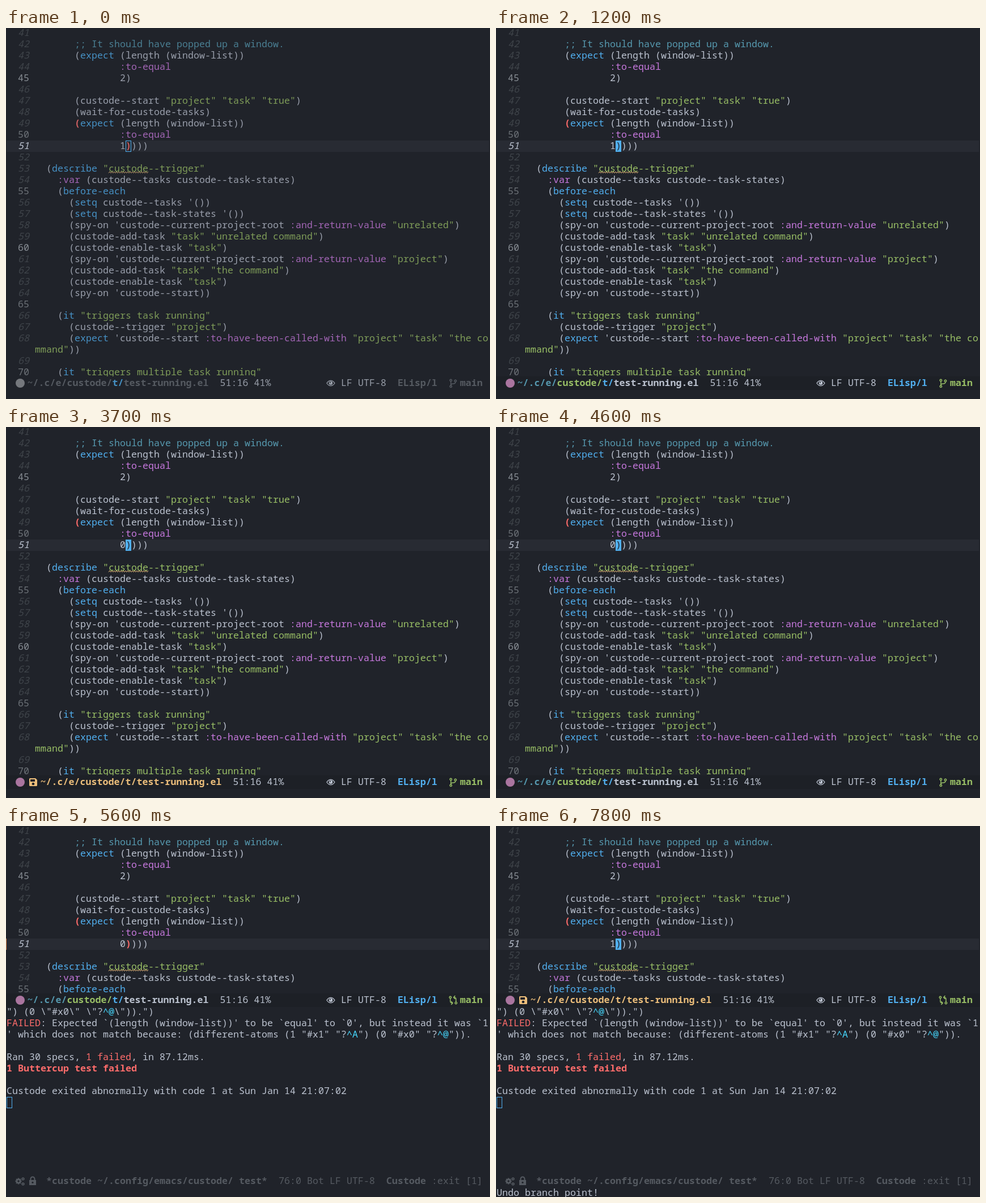
These frames come from a looping animation (854x656 px, 8 s). An HTML page with a canvas:

```html
<!DOCTYPE html>
<html lang="en">
<head>
<meta charset="utf-8">
<title>Editor session</title>
<style>
html, body { margin: 0; width: 100%; height: 100%; overflow: hidden; background: #20232a; }
canvas { display: block; }
</style>
</head>
<body>
<canvas id="stage" width="854" height="656"></canvas>
<script>
const g = document.getElementById('stage').getContext('2d');
const LOOP = 8000, COL = 10, ROW = 20;
const FONT = '16.667px "Noto Sans Mono", "DejaVu Sans Mono", monospace';
const C = {
  bg: '#20232a', line: '#282b33', bar: '#1d2026', fg: '#bbc2cf', blue: '#51afef',
  green: '#98be65', magenta: '#c678dd', teal: '#5699af', red: '#ff6c6b', cyan: '#46d9ff',
  yellow: '#ecbe7b', orange: '#da8548', purple: '#aa759f', grey: '#555a61',
  num: '#3f444a', tick: '#6b7076', major: '#868c93'
};

// Each entry: starting column, then code, from line 41 on
const CODE = [
  [0, ''],
  [12, ';; It should have popped up a window.'],
  [12, '(expect (length (window-list))'],
  [20, ':to-equal'],
  [20, '2)'],
  [0, ''],
  [12, '(custode--start "project" "task" "true")'],
  [12, '(wait-for-custode-tasks)'],
  [12, '(expect (length (window-list))'],
  [20, ':to-equal'],
  [20, ''],
  [0, ''],
  [7, '(describe "custode--trigger"'],
  [9, ':var (custode--tasks custode--task-states)'],
  [9, '(before-each'],
  [11, "(setq custode--tasks '())"],
  [11, "(setq custode--task-states '())"],
  [11, '(spy-on \'custode--current-project-root :and-return-value "unrelated")'],
  [11, '(custode-add-task "task" "unrelated command")'],
  [11, '(custode-enable-task "task")'],
  [11, '(spy-on \'custode--current-project-root :and-return-value "project")'],
  [11, '(custode-add-task "task" "the command")'],
  [11, '(custode-enable-task "task")'],
  [11, "(spy-on 'custode--start))"],
  [0, ''],
  [9, '(it "triggers task running"'],
  [11, '(custode--trigger "project")'],
  [11, '(expect \'custode--start :to-have-been-called-with "project" "task" "the command"))'],
  [0, ''],
  [9, '(it "triggers multiple task running"']
];
const TOKEN = /(;;.*)|("[^"]*")|(:[a-z-]+)|((?<=\()(?:expect|describe|before-each|setq|it)(?![\w-]))|./g;
const TOKEN_COLORS = [C.teal, C.green, C.magenta, C.blue];

const REPORT = [
  [16, [['") (0 \\"#x0\\" \\"?'], ['^@', C.cyan], ['\\")).")']]],
  [17, [['FAILED', C.red], [": Expected `(length (window-list))' to be `equal' to `0', but instead it was `1"]]],
  [18, [['\' which does not match because: (different-atoms (1 "#x1" "?'], ['^A', C.cyan],
        ['") (0 "#x0" "?'], ['^@', C.cyan], ['")).']]],
  [20, [['Ran 30 specs, '], ['1 failed', C.red], [', in 87.12ms.']]],
  [21, [['1 Buttercup test failed', C.red, 'bold']]],
  [23, [['Custode exited abnormally with code 1 at Sun Jan 14 21:07:02']]]
];

const base = row => row * ROW + 14;
const left = col => 1 + col * COL;

function rect(x, y, w, h, color) {
  g.fillStyle = color;
  g.fillRect(x, y, w, h);
}

function text(s, x, y, color = C.fg, style = '') {
  g.font = style + ' ' + FONT;
  g.fillStyle = color;
  for (let i = 0; i < s.length; i++) {
    if (s[i] !== ' ') g.fillText(s[i], x + i * COL, y);
  }
}

function runs(parts, x, y) {
  for (const [s, color, style] of parts) {
    text(s, x, y, color, style);
    x += s.length * COL;
  }
}

function clipped(y, h, draw) {
  g.save();
  g.beginPath();
  g.rect(0, y, 854, h);
  g.clip();
  draw();
  g.restore();
}

function disc(x, y, r, color) {
  g.fillStyle = color;
  g.beginPath();
  g.arc(x, y, r, 0, 7);
  g.fill();
}

function stroke(d, color, width = 1.5) {
  g.strokeStyle = color;
  g.lineWidth = width;
  g.stroke(new Path2D(d));
}

// Icons, centred on x, y
function at(x, y, draw) {
  g.save();
  g.translate(x, y);
  draw();
  g.restore();
}

const floppy = (x, y) => at(x, y, () => {
  g.fillStyle = C.yellow;
  g.fill(new Path2D('M-6-7H4L7-4V6L6 7H-6L-7 6V-6Z'));
  rect(-5, -5, 8, 4, C.bar);
  disc(0, 3, 2.3, C.bar);
});

const eye = (x, y, color) => at(x, y, () => {
  stroke('M-7 0Q-4-4.7 0-4.7T7 0Q4 4.7 0 4.7T-7 0Z', color, 1.3);
  disc(0, -.3, 3.3, color);
  disc(-1, -1.3, 1, C.bar);
});

const branch = (x, y, color) => at(x, y, () => {
  stroke('M-4-3V4M4-2Q4 1 0 1Q-4 1-4 4M-2.4-5a1.7 1.7 0 1 1-3.4 0a1.7 1.7 0 1 1 3.4 0' +
    'M-2.4 5.8a1.7 1.7 0 1 1-3.4 0a1.7 1.7 0 1 1 3.4 0M5.7-4a1.7 1.7 0 1 1-3.4 0a1.7 1.7 0 1 1 3.4 0', color);
});

const compare = (x, y, color) => at(x, y, () => {
  for (const turn of [0, Math.PI]) {
    g.save();
    g.rotate(turn);
    stroke('M-5-3V2Q-5 5-1 5M-3.5 2L-.8 5L-3.5 8M-3.3-5a1.7 1.7 0 1 1-3.4 0a1.7 1.7 0 1 1 3.4 0', color);
    g.restore();
  }
});

function gear(x, y, r, color) {
  g.strokeStyle = color;
  g.lineWidth = r * .5;
  g.beginPath();
  g.arc(x, y, r * .6, 0, 7);
  for (let i = 0; i < 8; i++) {
    const a = i * Math.PI / 4, c = Math.cos(a), s = Math.sin(a);
    g.moveTo(x + c * r * .7, y + s * r * .7);
    g.lineTo(x + c * r * 1.1, y + s * r * 1.1);
  }
  g.stroke();
}

const lock = (x, y, color) => at(x, y, () => {
  stroke('M-3.5-1V-4a3.5 3.5 0 0 1 7 0V-1', color, 2);
  rect(-6, -2, 12, 9, color);
  disc(0, 2.3, 1.6, C.bg);
});

function lineNumbers(rows) {
  for (let r = 0; r < rows; r++) {
    if (r === 28) continue;
    const n = 41 + (r > 28 ? r - 1 : r);
    let color = C.num, style = 'italic';
    if (n === 51) color = C.fg;
    else if (n % 5 === 0) {
      color = n === 45 || n === 60 ? C.major : C.tick;
      style = '';
    }
    text(String(n), left(2), base(r), color, style);
  }
}

function codeLine(col, s, row) {
  for (const m of s.matchAll(TOKEN)) {
    const kind = [1, 2, 3, 4].find(k => m[k]);
    const color = kind ? TOKEN_COLORS[kind - 1] : C.fg;
    for (const ch of m[0]) {
      if (col === 85) { col = 5; row++; }
      text(ch, left(col++), base(row), color);
    }
  }
  return row + 1;
}

function squiggle(x, y, w) {
  g.strokeStyle = C.yellow;
  g.lineWidth = 1;
  g.beginPath();
  for (let i = 0; i <= w; i += 2) g.lineTo(x + i, y + (i % 4 ? 0 : 2.5));
  g.stroke();
}

function hollow(x, y) {
  g.strokeStyle = C.blue;
  g.lineWidth = 1;
  g.strokeRect(x + .5, y + .5, 9, 19);
}

function editor(s) {
  clipped(0, s.split ? 296 : 616, () => {
    rect(1, 199, 851, 20, C.line);
    if (s.fringe) rect(0, 199, 1, 20, C.orange);
    lineNumbers(31);
    g.globalAlpha = s.focus ? 1 : .78;
    let row = 0;
    for (const [col, code] of CODE) row = codeLine(col, code, row);
    squiggle(181, 254, 70);
    rect(left(12), 159, COL, ROW, C.bg);
    text('(', left(12), base(8), C.red, 'bold');
    const col = 20 + s.digit.length, x = left(col);
    text(s.digit, left(20), base(10));
    text(')))', left(col + 1), base(10));
    if (s.cursor !== 'on') text(')', x, base(10), C.red, 'bold');
    g.globalAlpha = 1;
    if (s.cursor === 'hollow') hollow(x, 199);
    if (s.cursor === 'on') {
      rect(x, 199, COL, ROW, C.blue);
      text(')', x, base(10), C.bg);
    }
  });
}

function modeline(s) {
  const top = s.split ? 296 : 616, mid = top + 12, y = top + 17;
  const soft = s.focus ? C.fg : '#969ca7';
  const pick = color => s.focus ? color : C.grey;
  if (s.focus) rect(0, top, 854, 24, C.bar);
  disc(25, mid, 8, s.focus ? C.purple : '#75787d');
  if (s.dirty) {
    floppy(48, mid);
    text('~/.c/e/custode/t/test-running.el', 60.5, y, C.yellow, 'bold');
  } else {
    runs([
      ['~/.c/e/', pick(C.teal), 'bold'],
      ['custode/', pick(C.green), 'bold'],
      ['t/', s.focus ? C.blue : '#4592c6', 'bold'],
      ['test-running.el', pick(C.fg), 'bold']
    ], 37.5, y);
  }
  text(`51:${15 + s.digit.length} 41%`, s.dirty ? 400.5 : 377.5, y, soft);
  eye(573, mid, s.running ? C.yellow : soft);
  text('LF UTF-8', 591, y, soft);
  text('ELisp/l', 691, y, pick(C.blue), 'bold');
  (s.changed ? compare : branch)(789, mid, pick(C.green));
  text('main', 801, y, pick(C.green), 'bold');
}

function report() {
  for (const [row, parts] of REPORT) runs(parts, left(0), base(row));
  hollow(1, 479);
  gear(22, 628, 5, C.grey);
  gear(30, 624, 2.6, C.grey);
  gear(30, 633, 2.6, C.grey);
  lock(47, 628, C.grey);
  text('*custode ~/.config/emacs/custode/ test*', 71, 633, C.grey, 'bold');
  text('76:0 Bot LF UTF-8', 481, 633, C.grey);
  text('Custode', 671, 633, C.grey, 'bold');
  text(':exit [1]', 751, 633, C.grey);
}

const within = (t, ...spans) => spans.some(([a, b]) => t >= a && t < b);

function stateAt(t) {
  const off = within(t, [1600, 2000], [2500, 3100], [3600, 3700], [4100, 4200], [5600, 6100], [6600, 7100]);
  return {
    focus: t >= 1200,
    cursor: t < 1100 ? 'hollow' : off ? 'off' : 'on',
    digit: within(t, [2000, 3700], [7500, 7800]) ? '' : within(t, [3700, 7500]) ? '0' : '1',
    dirty: within(t, [2000, 4600], [7500, LOOP]),
    running: within(t, [4800, 5600]),
    changed: t >= 4900,
    fringe: within(t, [5000, 7500]),
    split: t >= 5600,
    edge: within(t, [600, 1200]),
    echo: within(t, [4700, 5600]) ? 'Wrote /home/pel/.config/emacs/custode/tests/test-running.el'
      : t >= 7800 ? 'Undo branch point!' : ''
  };
}

function frame() {
  const s = stateAt(performance.now() % LOOP);
  rect(0, 0, 854, 656, C.bg);
  editor(s);
  modeline(s);
  if (s.split) report();
  text(s.echo, left(0), base(32));
  if (s.edge) rect(0, 654, 854, 2, '#3b8ed6');
  requestAnimationFrame(frame);
}
frame();
</script>
</body>
</html>
```
